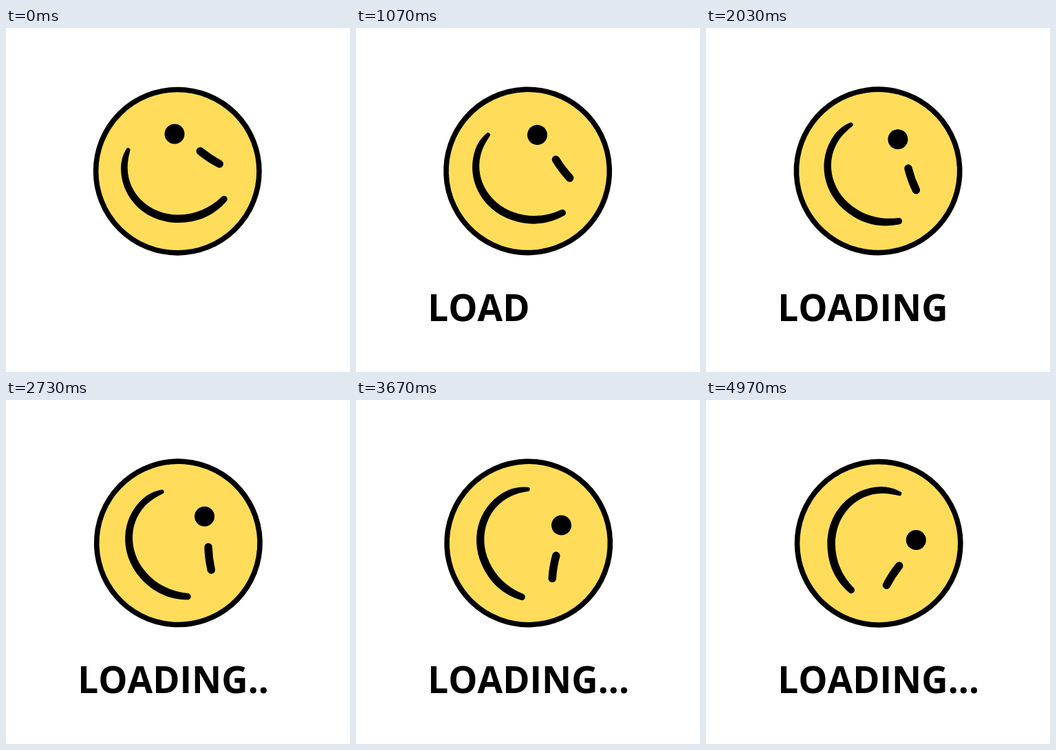
These frames come from a looping animation (500x500 px, 5.01 s). An HTML page:

```html
<!DOCTYPE html>
<html lang="en">
<head>
<meta charset="utf-8">
<title>Loading</title>
<style>
  html, body { margin: 0; width: 100%; height: 100%; overflow: hidden; background: #fff; }
  svg { display: block; width: 100%; height: 100%; }
  text { font: 700 53.1px "Open Sans", sans-serif; font-kerning: none; }
</style>
</head>
<body>
<svg viewBox="0 0 500 500">
  <g id="face">
    <circle cx="249.3" cy="208.2" r="118.7" fill="#ffdd5a" stroke="#000" stroke-width="7.6"/>
    <circle cx="245" cy="154" r="14.5"/>
    <path d="M282.3 179Q295 189.5 310.2 197.5" fill="none" stroke="#000" stroke-width="11.5" stroke-linecap="round"/>
    <path d="M174.5 176.5C170 184 167 194 167 204C167.5 249 204.5 283 250.5 283
      C279.5 283 302.5 272 320 252.5A4.8 4.8 0 0 0 314 245C296.5 262 274.5 271.5 250.5 271.5
      C208.5 271.5 176.7 240.5 176.7 203C176.7 195 178 187 180.3 178.5A3 3 0 0 0 174.5 176.5Z"/>
  </g>
  <text id="label" x="104.3" y="426"></text>
</svg>
<script>
const LOOP = 5010, WORD = "LOADING...";
const FIRST_KEY = 170, KEY_GAP = 290; // typing times in ms
const SPIN = 0.018; // degrees per ms
const face = document.getElementById("face");
const label = document.getElementById("label");
const start = performance.now();

function draw() {
  const t = (performance.now() - start) % LOOP;
  face.setAttribute("transform", `rotate(${t * SPIN} 250.2 209.2)`);
  const typed = Math.max(0, Math.floor((t - FIRST_KEY) / KEY_GAP) + 1);
  label.textContent = WORD.slice(0, typed);
  requestAnimationFrame(draw);
}
draw();
</script>
</body>
</html>
```
